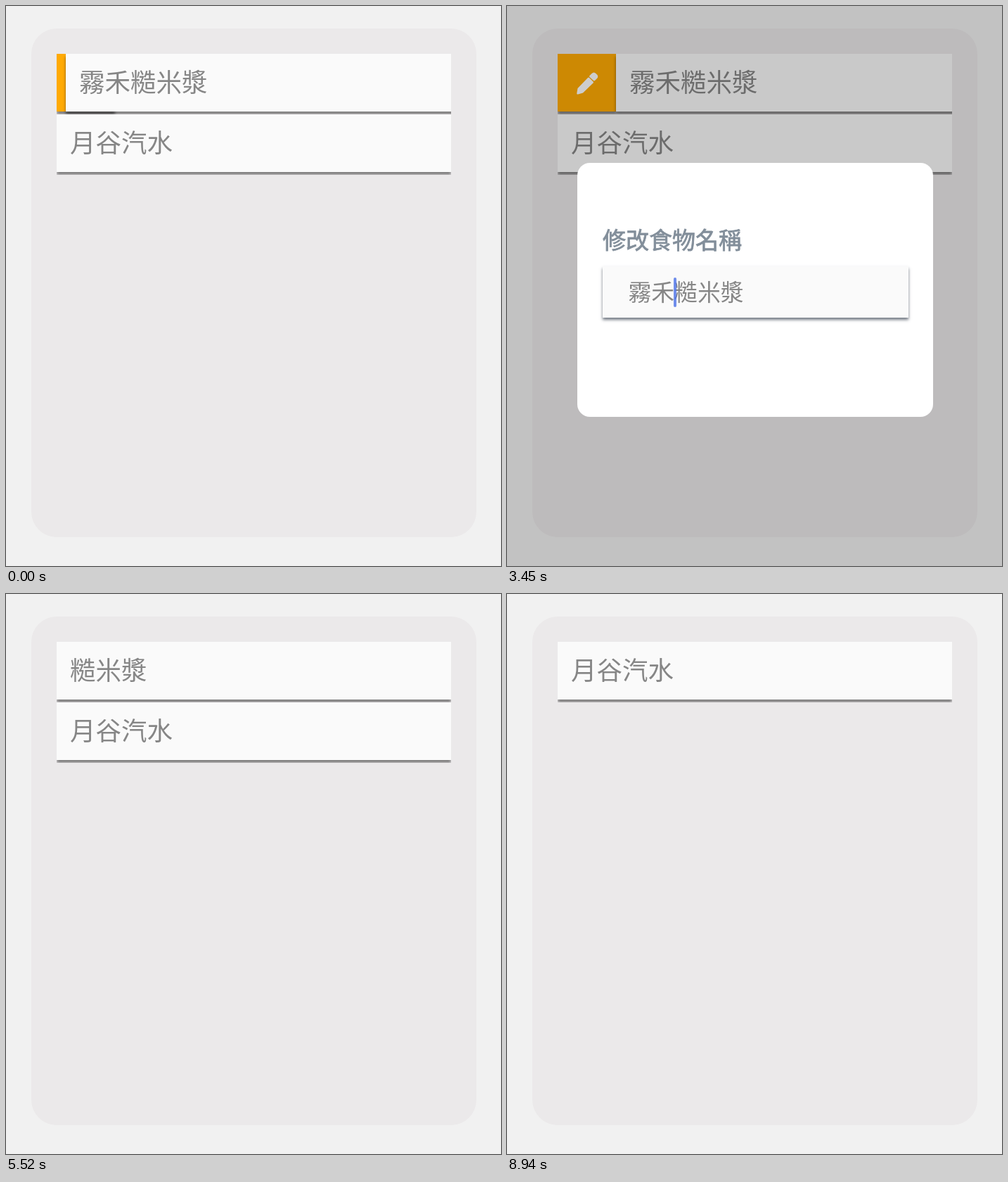
Animation, 704 px wide and 796 px high, one loop 8970 ms. Source, as an HTML page:

```html
<!DOCTYPE html>
<html lang="zh-Hant">
<head>
<meta charset="utf-8">
<title>Swipe list</title>
<style>
html, body { margin: 0; width: 100%; height: 100%; overflow: hidden; background: #f1f1f1; }
body { position: relative; font-family: "Noto Sans CJK TC", "Noto Sans CJK", sans-serif; color: #868686; }
div, svg { position: absolute; box-sizing: border-box; white-space: nowrap; }
#panel { left: 36px; top: 32px; width: 633px; height: 723px; border-radius: 36px; background: #ebe9ea; }
.slot { left: 72px; top: 68px; width: 561px; height: 86px; overflow: hidden; }
.slot > div { left: 0; top: 0; width: 561px; height: 82px; box-shadow: 0 4px 4px rgba(0, 0, 0, .48); }
.slot > .row { padding-left: 19px; background: #fafafa; font: 300 36.5px/78px "Noto Sans CJK TC", "Noto Sans CJK", sans-serif; }
.slot > #edit { width: 83px; background: #ffaa04; }
#remove { background: #fc3a3b; }
#edit svg { left: 27px; top: 26px; }
#shade { inset: 0; background: #000; }
#dialog { left: 100px; top: 223px; width: 506px; height: 361px; border-radius: 18px; background: #fff; }
#label { left: 36px; top: 88px; font-size: 33px; line-height: 40px; color: #828e9a; -webkit-text-stroke: .8px #828e9a; }
#field { left: 36px; top: 147px; width: 435px; height: 73px; padding-left: 36.5px; background: #fafafa;
  box-shadow: 0 3px 4px rgba(65, 75, 88, .75); font-size: 32.8px; line-height: 70px; font-weight: 300; }
#caret { top: 163px; width: 3.6px; height: 42px; border-radius: 2px; background: #4169e6; }
</style>
</head>
<body>
<div id="panel"></div>
<div class="slot" id="top">
  <div id="remove"></div>
  <div id="edit"><svg width="31" height="32" fill="#fff">
    <path d="M1.5 23 16 8q1-.8 2 0l5.5 5.5q1 1 0 2L9 29.5 2 31.5Q0 32 .3 30Z"/>
    <path d="M18.5 5 21.5 2q3-3 6 0l1.5 1.5q2.5 2.7 0 5.5l-3 3q-1 .8-2 0L18.5 7q-.8-1 0-2Z"/>
  </svg></div>
  <div class="row" id="first"></div>
</div>
<div class="slot" id="second"><div class="row">月谷汽水</div></div>
<div id="shade"></div>
<div id="dialog">
  <div id="label">修改食物名稱</div>
  <div id="field"></div>
  <div id="caret"></div>
</div>
<script>
const LOOP = 8970, BRAND = "霧禾", FOOD = "糙米漿";
const el = id => document.getElementById(id);
const [topSlot, first, second, edit, removal, shade, dialog, field, caret] =
  ["top", "first", "second", "edit", "remove", "shade", "dialog", "field", "caret"].map(el);

const ramp = (t, from, to) => Math.min(1, Math.max(0, (t - from) / (to - from)));
const smooth = (t, from, to) => { const p = ramp(t, from, to); return p * p * (3 - 2 * p); };
// Critically damped spring: the part of the way still to go
const rest = (t, start, w) => {
  const s = Math.max(0, t - start) / 1000 * w;
  return (1 + s) * Math.exp(-s);
};

function rowOffset(t) {
  if (t >= 7330) return -9 - 552 * smooth(t, 7360, 8200);
  if (t < 4951) return 13 + 70 * (1 - (1 - ramp(t, 50, 370)) ** 2);
  return t < 5520 ? 83 * rest(t, 4951, 15.5) : 0;
}

function dialogScale(t) {
  if (t < 1450 || t >= 5520) return 0;
  if (t < 2720) return 1 - rest(t, 1450, 13);
  return rest(t, 5067, 15.6);
}

function shadeLevel(t) {
  const touch = 1 - smooth(t, 4620, 4770) + smooth(t, 4930, 5180);
  const fade = smooth(t, 1380, 1690) * (1 - smooth(t, 4970, 5210));
  return .195 * touch * fade;
}

function caretLevel(t) {
  if (t < 3450) return 0;
  return .75 + .25 * ramp(t, 3450, 3530) - ramp(t, 4320, 4430) + ramp(t, 4720, 4830);
}

function draw(t) {
  const x = rowOffset(t);
  first.style.transform = `translateX(${x}px)`;
  first.textContent = (t < 4890 ? BRAND : "") + FOOD;
  edit.style.display = x > 0 ? "" : "none";
  edit.style.opacity = 1 - .65 * (smooth(t, 1060, 1180) - smooth(t, 1360, 1560));
  removal.style.display = x < 0 ? "" : "none";
  // The emptied slot collapses and the next row moves up
  const height = t < 8930 ? 86 * rest(t, 8215, 11) : 0;
  topSlot.style.height = height + "px";
  second.style.top = 68 + height + "px";

  shade.style.opacity = shadeLevel(t);
  dialog.style.transform = `scale(${dialogScale(t)})`;
  const kept = t < 3630 ? 2 : t < 3840 ? 1 : 0;
  field.textContent = BRAND.slice(0, kept) + FOOD;
  caret.style.left = 72.3 + 32.4 * kept + "px";
  caret.style.opacity = caretLevel(t);
}

const start = performance.now();
function tick() {
  draw((performance.now() - start) % LOOP);
  requestAnimationFrame(tick);
}
tick();
</script>
</body>
</html>
```
